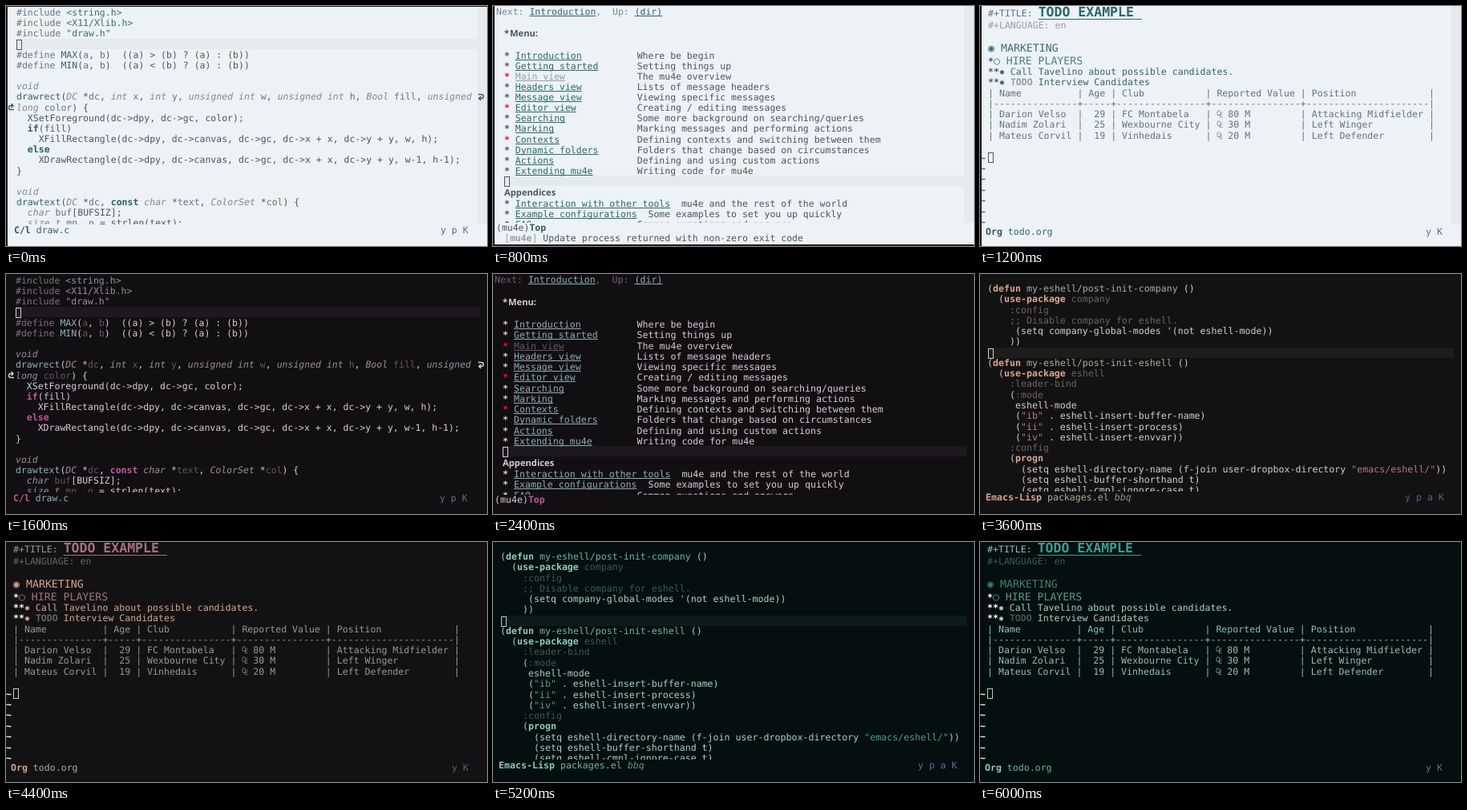
These frames come from a looping animation (600 px wide and 300 px high, 6.4 s). An HTML page:

```html
<!DOCTYPE html>
<html lang="en">
<head>
<meta charset="utf-8">
<title>Editor themes</title>
<style>
html, body { margin: 0; width: 100%; height: 100%; overflow: hidden; }
#stage { position: relative; width: 600px; height: 300px; overflow: hidden;
  background: var(--bg); color: var(--text);
  font-family: "DejaVu Sans Mono", monospace; text-rendering: geometricPrecision; }
pre, i, svg { position: absolute; margin: 0; }
pre { font: inherit; line-height: 14px; white-space: pre; }
i { box-sizing: border-box; }
svg { fill: none; stroke: var(--text); stroke-width: 1.5; }
span { line-height: 0; }
.d { color: var(--dim); }
.q { color: var(--arg); }
.y { color: var(--type); font-style: italic; }
.k { color: var(--key); font-weight: bold; }
.f { color: var(--func); }
.s { color: var(--str); }
.p { color: var(--pre); }
.r { color: var(--right); }
.n { color: var(--next); }
.e { color: var(--h3); }
.g { color: var(--table); }
.w { color: var(--dim); font-weight: bold; }
.a { color: var(--h1); font-size: 13.25px; }
.b { color: var(--h2); font-size: 13.2px; }
.t { color: var(--title); font-size: 16.5px; font-weight: bold;
  text-decoration: underline 1px; text-underline-offset: 3px; }
.l, .v { color: var(--link); text-decoration: underline 1px;
  text-underline-offset: 1px; text-decoration-skip-ink: none; }
.v { color: var(--dim); }
.x { color: #e8161b; font-weight: bold; }
.z { font-weight: bold; }
.c { color: var(--star); font-weight: bold; }
.m { font: bold 11.2px "Open Sans", sans-serif; word-spacing: -2px; }
</style>
</head>
<body>
<div id="stage"></div>
<script>
const stage = document.getElementById('stage');
const roles = 'bg hl text dim arg type key func str pre right title h1 h2 h3 table next link star'.split(' ');
const themes = [
  '#ecf2f5 #e4eaed #4d585e #959fa4 #67737a #808a8f #2c5d61 #36666a #3d7068 #6c777c #5d6b92 #2c6468 #36707a #4f7f80 #36666a #66737a #7d888d #2d6a66 #4d585e',
  '#120f13 #1e191f #d8ccd4 #5f575f #5f575f #978f97 #c4569b #8fb3b4 #988f9b #7a717c #686d80 #c4569b #c4569b #8fb3b4 #d8ccd4 #a29aa2 #745d70 #8dadb2 #ffffff',
  '#131213 #1f1c1c #d6cdc6 #686461 #686461 #968c86 #d9a58f #a5b096 #b07a86 #968c86 #5d5f86 #a6707e #d9a58f #a6707e #d9a58f #9c9690 #756a66 #a5b096 #ffffff',
  '#050f10 #0d1b1c #a9d2c4 #38595a #38595a #5f918a #8fcbb5 #6fb5a5 #4f9c8f #7fa69f #5c6e94 #3f9a94 #3d7f78 #4f9c8f #a3d4bf #8fbfae #4b7873 #4f9c8f #ffffff'
].map(row => row.split(' '));

// §kword§ styles a run of text with class k
const mark = s => s.replace(/&/g, '&amp;').replace(/</g, '&lt;')
  .replace(/§(.)(.*?)§/g, '<span class="$1">$2</span>');
const line = (x, y, s) => `<pre style="left:${x}px;top:${y - 7}px">${mark(s)}</pre>`;
const box = (x, y, w, h, style) =>
  `<i style="left:${x}px;top:${y}px;width:${w}px;height:${h}px;${style}"></i>`;
const fill = (x, y, w, h, color) => box(x, y, w, h, `background:${color}`);
const cursor = (x, y) => box(x, y - 6, 7, 13, 'border:1px solid var(--text)');
const current = (x, y) => fill(x, y - 7, 591 - x, 13, 'var(--hl)') + cursor(x, y);
const lines = (x, y, pitch, rows) => rows.map((s, i) => line(x, y + i * pitch, s)).join('');
const bar = (top, x, y, left, rightX = 0, right = '') =>
  fill(0, top, 600, 300 - top, 'var(--bg)') + line(x, y, left) + line(rightX, y, `§r${right}§`);
const hook = (x, y, turn) => `<svg width="9" height="9" style="left:${x}px;top:${y}px;` +
  `transform:rotate(${turn}deg)"><path d="M1 1.5H5Q7.5 1.5 7.5 4T5 6.5H2M4.5 4L2 6.5L4.5 9"/></svg>`;

const code = `§p#include§ §s<string.h>§
§p#include§ §s<X11/Xlib.h>§
§p#include§ §s"draw.h"§

§p#define§ §fMAX§(§qa§, §qb§)  ((a) > (b) ? (a) : (b))
§p#define§ §fMIN§(§qa§, §qb§)  ((a) < (b) ? (a) : (b))

§yvoid§
§fdrawrect§(§yDC§ *§qdc§, §yint§ §qx§, §yint§ §qy§, §yunsigned int§ §qw§, §yunsigned int§ §qh§, §yBool§ §qfill§, §yunsigned§
§ylong§ §qcolor§) {
  XSetForeground(dc->dpy, dc->gc, color);
  §kif§(fill)
    XFillRectangle(dc->dpy, dc->canvas, dc->gc, dc->x + x, dc->y + y, w, h);
  §kelse§
    XDrawRectangle(dc->dpy, dc->canvas, dc->gc, dc->x + x, dc->y + y, w-1, h-1);
}

§yvoid§
§fdrawtext§(§yDC§ *§qdc§, §kconst§ §ychar§ *§qtext§, §yColorSet§ *§qcol§) {
  §ychar§ §qbuf§[BUFSIZ];
  §ysize_t§ §qmn§, §qn§ = strlen(text);`.split('\n');

const lisp = `(§kdefun§ §fmy-eshell/post-init-company§ ()
  (§kuse-package§ §dcompany§
    §d:config§
    §d;; Disable company for eshell.§
     (setq company-global-modes '(not eshell-mode))
    ))

(§kdefun§ §fmy-eshell/post-init-eshell§ ()
  (§kuse-package§ §deshell§
    §d:leader-bind§
    (§d:mode§
     eshell-mode
     (§s"ib"§ . eshell-insert-buffer-name)
     (§s"ii"§ . eshell-insert-process)
     (§s"iv"§ . eshell-insert-envvar))
    §d:config§
    (§kprogn§
      (setq eshell-directory-name (f-join user-dropbox-directory §s"emacs/eshell/"§))
      (setq eshell-buffer-shorthand t)
      (setq eshell-cmpl-ignore-case t)`.split('\n');

const menu = `Introduction|Where be begin
Getting started|Setting things up
Main view|The mu4e overview
Headers view|Lists of message headers
Message view|Viewing specific messages
Editor view|Creating / editing messages
Searching|Some more background on searching/queries
Marking|Marking messages and performing actions
Contexts|Defining contexts and switching between them
Dynamic folders|Folders that change based on circumstances
Actions|Defining and using custom actions
Extending mu4e|Writing code for mu4e
Interaction with other tools|mu4e and the rest of the world
Example configurations|Some examples to set you up quickly
FAQ|Common questions and answers`.split('\n').map((row, i) => {
  const [name, about] = row.split('|');
  const star = i < 9 && i % 3 === 2 ? 'x' : 'z';
  const gap = ' '.repeat(Math.max(2, 22 - name.length));
  return `§${star}*§ §${i === 2 ? 'v' : 'l'}${name}§${gap}${about}`;
});

const table = `| Name          | Age | Club           | Reported Value | Position             |
|---------------+-----+----------------+----------------+----------------------|
| Darion Velso  |  29 | FC Montabela   | ₠ 80 M         | Attacking Midfielder |
| Nadim Zolari  |  25 | Wexbourne City | ₠ 30 M         | Left Winger          |
| Mateus Corvil |  19 | Vinhedais      | ₠ 20 M         | Left Defender        |`
  .split('\n').map(row => `§g${row}§`);

function drawCode(light) {
  const x = light ? 13 : 12;
  return current(x, 48) + lines(x, 8, 13.17, code) +
    hook(588, 109, 0) + hook(2, 122, 180) +
    bar(273, x - 3, 280, '§kC/l§ §fdraw.c§', 529 + x, 'y p K') +
    (light ? fill(0, 0, 600, 1, '#1b1d22') : '');
}

function drawLisp(light) {
  const x = light ? 10 : 9;
  return current(x + 1, 98.5) + lines(x, 18, 13.27, lisp) +
    bar(272, x - 2, 279, '§kEmacs-Lisp§ §fpackages.el§ §ybbq§', 530, 'y p a K');
}

function drawInfo(light) {
  const [x, top, pitch] = light ? [14, 61.5, 13.13] : [12, 63, 13.27];
  return current(x, top + 12 * pitch) +
    line(light ? 4 : 2, 7, '§nNext: §§lIntroduction§§n,  Up: §§l(dir)§') +
    line(x, top - 28, '§m* Menu:§') + lines(x, top, pitch, menu.slice(0, 12)) +
    line(x, top + 13 * pitch + 0.7, '§mAppendices§') +
    lines(x, top + 14 * pitch + 1.4, pitch, menu.slice(12)) +
    (light
      ? bar(271, 4, 277, '(mu4e)§kTop§') + fill(0, 298, 600, 2, '#1b1d22') +
        line(14, 290, '§d[§§wmu4e§§d]§ Update process returned with non-zero exit code')
      : bar(276, 2, 282, '(mu4e)§kTop§'));
}

function drawOrg(light) {
  const x = light ? 10 : 9;
  return line(x, 8.5, '§g#+TITLE:§ §tTODO EXAMPLE §') +
    line(x, 24, '§d#+LANGUAGE: en§') +
    line(x, 53, '§a◉ MARKETING§') +
    line(x, 69, '§c*§§b○ HIRE PLAYERS§') +
    line(x, 82, '§c**§§e✸ Call Tavelino about possible candidates.§') +
    line(x, 95, '§c**§§e✸§ §wTODO§ §eInterview Candidates§') +
    lines(x, 108.5, 13.3, table) +
    lines(0, 189.5, 13.4, Array(7).fill('§c~§')) + cursor(x, 189) +
    bar(276, x - 3, 282, '§kOrg§ §ftodo.org§', 556, 'y K');
}

const screens = [drawCode, drawLisp, drawInfo, drawOrg];
const cellWidths = [6.93, 7, 6.985, 6.97];

function show(step) {
  const theme = step >> 2, screen = step & 3, light = theme === 0;
  roles.forEach((role, i) => stage.style.setProperty('--' + role, themes[theme][i]));
  stage.style.fontSize = (light && screen === 2 ? 6.91 : cellWidths[screen]) / 0.60205 + 'px';
  stage.innerHTML = (light ? fill(588, 0, 12, 272, 'var(--hl)') : '') +
    screens[screen](light) + (light ? fill(0, 0, 2, 300, '#1b1d22') : '');
}

let shown = -1;
function tick() {
  const step = Math.floor(performance.now() % 6400 / 400);
  if (step !== shown) show(shown = step);
  requestAnimationFrame(tick);
}
tick();
</script>
</body>
</html>
```
